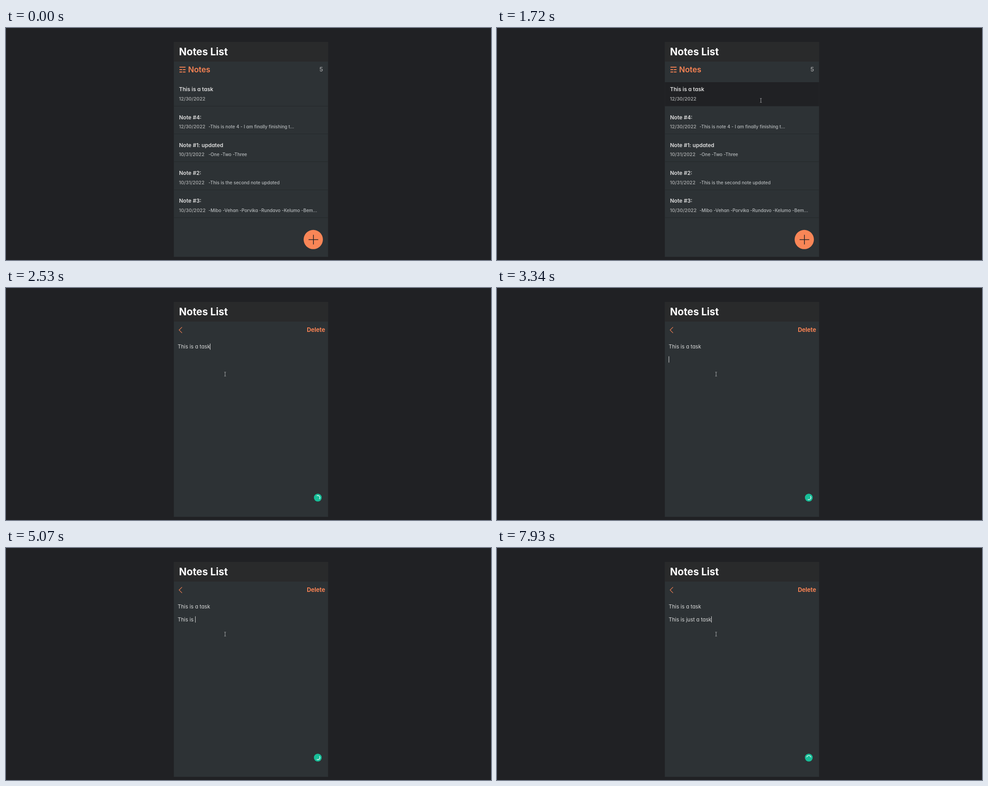
Animation of 1082 by 518 pixels, one loop 8 s. Source, as an HTML page:

```html
<!DOCTYPE html>
<html lang="en">
<head>
<meta charset="utf-8">
<title>Notes List</title>
<style>
  html, body { margin: 0; width: 100%; height: 100%; overflow: hidden; background: #202124; }
  svg { display: block; width: 1082px; height: 518px; }
  text {
    font-family: Inter, "Open Sans", sans-serif;
    font-feature-settings: "cv11";
    white-space: pre;
  }
  .title { font-size: 22.3px; font-weight: 700; fill: #fff; }
  .heading { font-size: 17.4px; font-weight: 600; fill: #f98354; }
  .count { font-size: 13px; font-weight: 600; fill: #9a9c9d; }
  .name { font-size: 12px; font-weight: 600; fill: #dfdfdf; }
  .date { font-size: 10.5px; font-weight: 600; fill: #a0a2a3; }
  .body { font-size: 10.1px; font-weight: 500; fill: #b6babc; }
  .delete { font-size: 13px; font-weight: 700; fill: #f98354; }
  .edit { font-size: 11.6px; fill: #dadbdb; }
</style>
</head>
<body>
<svg viewBox="0 0 1082 518">
  <rect width="1082" height="518" fill="#202124"/>
  <rect x="374.5" y="31" width="344" height="480" fill="#2d3235"/>
  <rect x="374.5" y="31" width="344" height="44" fill="#292a2b"/>
  <text class="title" x="386" y="61">Notes List</text>

  <g id="list">
    <path d="M387 87.5h13.5M387 93h6M394.5 93h6M387 98.2h6M394.5 98.2h6" stroke="#f98354" stroke-width="1.9"/>
    <text class="heading" x="406.3" y="99.2">Notes</text>
    <text class="count" x="707.3" y="97.3" text-anchor="end">5</text>
    <rect id="pressed" x="374.5" y="121" width="344" height="53.7" fill="#202124"/>
    <g id="rows"></g>
    <circle cx="685.5" cy="472.3" r="21.5" fill="#f98657"/>
    <path d="M675 472.5h21.6M685.8 461.7v21.6" stroke="#202124" stroke-width="1.5"/>
  </g>

  <g id="editor">
    <path d="M392.7 87.3L386.2 93.8L392.7 100.3" fill="none" stroke="#f98354" stroke-width="1.2"/>
    <text class="delete" x="712" y="98.3" text-anchor="end">Delete</text>
    <text id="first" class="edit" x="383" y="135">This is a task</text>
    <text id="second" class="edit" x="383" y="163.7"></text>
    <rect id="caret" width="1" height="14" fill="#dcdcdc"/>
    <g id="spinner" transform="translate(695.6 468)">
      <circle r="8.7" fill="#18be98"/>
      <path id="arc" d="M1.1 -4.5A4.65 4.65 0 0 1 1.1 4.5" transform="rotate(0)"
        fill="none" stroke="#e6f8f4" stroke-width="1.4" stroke-linecap="round"/>
    </g>
  </g>

  <g id="cursor">
    <path id="arrow" d="M0 0v9.6l2.2-2 1.5 3.4 1.5-.7-1.5-3.2h3z" fill="#fff" stroke="#111" stroke-width=".6"/>
    <path id="hand" d="M-1 .7Q0-.5 1 .7V5l4.4 1Q6.6 6.3 6.4 7.6L5.6 12.5H-.4L-3.4 8Q-3.6 6.6-2.2 6.8L-1 8z" fill="#fff" stroke="#111" stroke-width=".6"/>
    <path id="beam" d="M-1.9-4.5H-.5L0-4 .5-4.5H1.9M0-4V4M-1.9 4.5H-.5L0 4 .5 4.5H1.9" fill="none" stroke="#c9cbcc" stroke-width=".8"/>
  </g>
</svg>
<script>
const LOOP = 8000, PRESS = 1650, OPEN = 1790, LOADED = 1990, FOCUS = 2440;
const el = id => document.getElementById(id);
const show = (id, on) => el(id).setAttribute("visibility", on ? "inherit" : "hidden");

const notes = [
  ["This is a task", "12/30/2022", ""],
  ["Note #4:", "12/30/2022", "-This is note 4 - I am finally finishing t..."],
  ["Note #1: updated", "10/31/2022", "-One -Two -Three"],
  ["Note #2:", "10/31/2022", "-This is the second note updated"],
  ["Note #3:", "10/30/2022", "-Mibo -Vehan -Porvika -Rundavo -Kelumo -Bem..."]
];
el("rows").innerHTML = notes.map(([name, date, body], i) => {
  const y = i * 62.2;
  return `<text class="name" x="386" y="${141.4 + y}">${name}</text>
    <text class="date" x="385.7" y="${162 + y}">${date}</text>
    <text class="body" x="451.7" y="${162 + y}">${body}</text>
    <rect x="374.5" y="${Math.round(174 + y)}" width="344" height="1" fill="#24282a"/>`;
}).join("");

// Key presses on the second line; the two line breaks come first.
const breaks = [3080, 3260];
const phrase = "This is just a task";
const keys = [4200, 4360, 4480, 4620, 4700, 4830, 4920, 5010, 5980, 6170,
  6360, 6500, 6620, 6780, 6980, 7250, 7500, 7790, 7870];
const inputs = [FOCUS, ...breaks, ...keys];

// Rows of [time, value, ...]
const pointer = [[270, 1058, 454], [1060, 600, 178], [1270, 581, 153],
  [1420, 581, 153], [1470, 589, 157], [1600, 589, 157], [1650, 588.7, 161.7],
  [1990, 588.7, 161.7], [2400, 488.8, 192.3]];
const turns = [[FOCUS, -94], [2530, -40], [4270, 900], [5070, 1480], [6430, 2160], [7930, 3150], [8000, 3195]];

function sample(track, t, ease = k => k) {
  const n = track.findIndex(p => p[0] > t);
  if (n === 0) return track[0].slice(1);
  if (n < 0) return track[track.length - 1].slice(1);
  const a = track[n - 1], b = track[n], k = ease((t - a[0]) / (b[0] - a[0]));
  return a.slice(1).map((v, i) => v + (b[i + 1] - v) * k);
}
const smooth = k => k * k * (3 - 2 * k);
const countBefore = (times, t) => times.filter(x => x <= t).length;

function drawCaret(t) {
  const lines = countBefore(breaks, t);
  const last = inputs[countBefore(inputs, t) - 1];
  show("caret", t >= FOCUS && (t - last) % 1060 < 530);
  const line = lines === 0 ? el("first") : el("second");
  const width = line.textContent ? line.getComputedTextLength() : 0;
  el("caret").setAttribute("x", Math.round(383 + width));
  el("caret").setAttribute("y", [124, 138, 152.5][lines]);
}

function drawCursor(t) {
  const [x, y] = sample(pointer, t, smooth);
  show("cursor", t >= 270);
  el("cursor").setAttribute("transform", `translate(${x} ${y})`);
  const inside = x < 718;
  show("arrow", t >= 270 && t < PRESS && !inside);
  show("hand", t >= 270 && t < PRESS && inside);
  show("beam", t >= PRESS);
}

function draw(t) {
  show("list", t < OPEN);
  show("editor", t >= OPEN);
  show("pressed", t >= PRESS && t < OPEN);
  show("first", t >= LOADED);
  el("second").textContent = phrase.slice(0, countBefore(keys, t));
  drawCaret(t);
  show("spinner", t >= FOCUS);
  el("arc").setAttribute("transform", `rotate(${sample(turns, t)[0]})`);
  drawCursor(t);
}

const start = performance.now();
function tick() {
  draw((performance.now() - start) % LOOP);
  requestAnimationFrame(tick);
}
tick();
</script>
</body>
</html>
```
